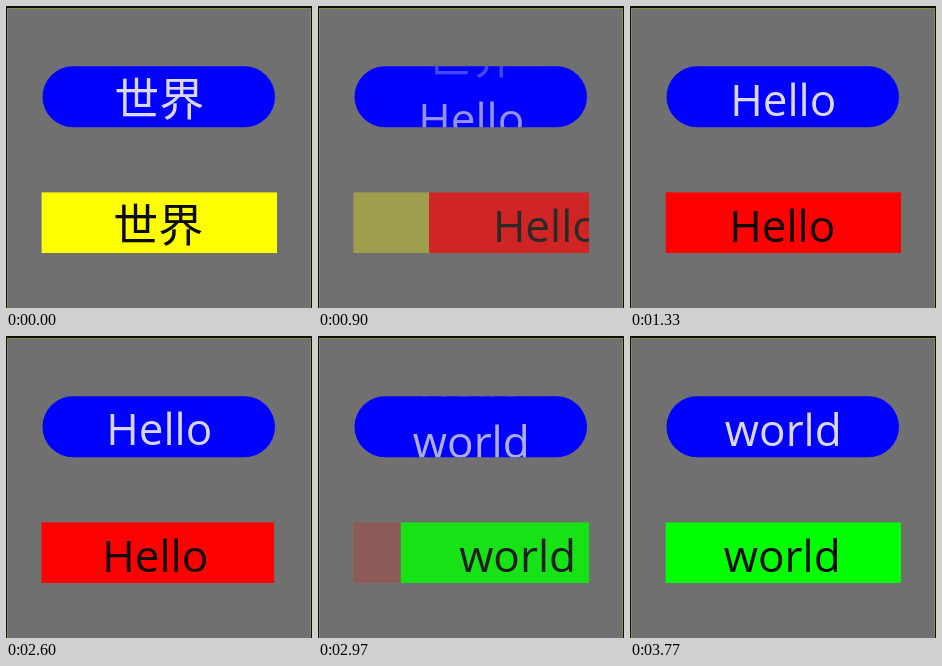
Write an HTML page that moves like this. It is 306 by 302 pixels and loops after 3870 ms.

```html
<!DOCTYPE html>
<html lang="zh-CN">
<head>
<meta charset="utf-8">
<style>
  html, body { margin: 0; width: 100%; height: 100%; overflow: hidden; background: #707070; }
  svg { display: block; }
  text { font-family: "Open Sans", "Noto Sans CJK SC", "Noto Sans CJK", sans-serif; text-anchor: middle; }
</style>
</head>
<body>
<svg width="306" height="302">
  <rect width="306" height="302" fill="#0e0e08"/>
  <rect x="1" y="2" width="304" height="300" fill="#707070"/>
  <path d="M1.5 302V2.5H304.5V302" fill="none" stroke="#8a8a44"/>
  <rect x="36.5" y="60.3" width="232.5" height="61" rx="30.5" fill="#00f"/>
  <svg id="pill" x="36.5" y="60.3" width="232.5" height="61"></svg>
  <svg id="bar" x="35.4" y="186.2" width="235.6" height="60.9"></svg>
</svg>
<script>
const LOOP = 3870, BAR_W = 235.6, PILL_H = 61;
const turns = [{ start: 552, length: 803 }, { start: 2542, length: 826 }];
const pages = [["世界", "#ff0", 45], ["Hello", "#f00", 44], ["world", "#0f0", 44]];

function add(parent, tag, attrs, content = "") {
  const el = document.createElementNS("http://www.w3.org/2000/svg", tag);
  for (const key in attrs) el.setAttribute(key, attrs[key]);
  el.textContent = content;
  return parent.appendChild(el);
}

const views = pages.map(([word, color, size]) => {
  const label = (parent, fill) =>
    add(parent, "text", { x: 116.8, y: 49.5, fill, "font-size": size }, word);
  const line = label(pill, "#dad8f6");
  const card = add(bar, "g", {});
  add(card, "rect", { width: BAR_W, height: 61, fill: color });
  label(card, "#0a0a08");
  return { line, card };
});

// cubic-bezier(.4, 0, .2, 1), solved by bisection
function ease(x) {
  if (x <= 0) return 0;
  if (x >= 1) return 1;
  let lo = 0, hi = 1, s;
  for (let i = 0; i < 24; i++) {
    s = (lo + hi) / 2;
    const r = 1 - s;
    if (1.2 * r * r * s + 0.6 * r * s * s + s ** 3 < x) lo = s; else hi = s;
  }
  return s * s * (3 - 2 * s);
}

function place(el, dx, dy, opacity) {
  el.setAttribute("transform", `translate(${dx} ${dy})`);
  el.setAttribute("opacity", opacity);
}

function draw(now) {
  const t = now % LOOP;
  const pos = turns.reduce((sum, { start, length }) => sum + ease((t - start) / length), 0);
  views.forEach(({ line, card }, i) => {
    const shift = i - pos, opacity = Math.max(0, 1 - Math.abs(shift));
    place(line, 0, shift * PILL_H, opacity);
    place(card, shift * BAR_W, 0, opacity);
  });
}

const begin = performance.now();
function tick() {
  draw(performance.now() - begin);
  requestAnimationFrame(tick);
}
tick();
</script>
</body>
</html>
```
